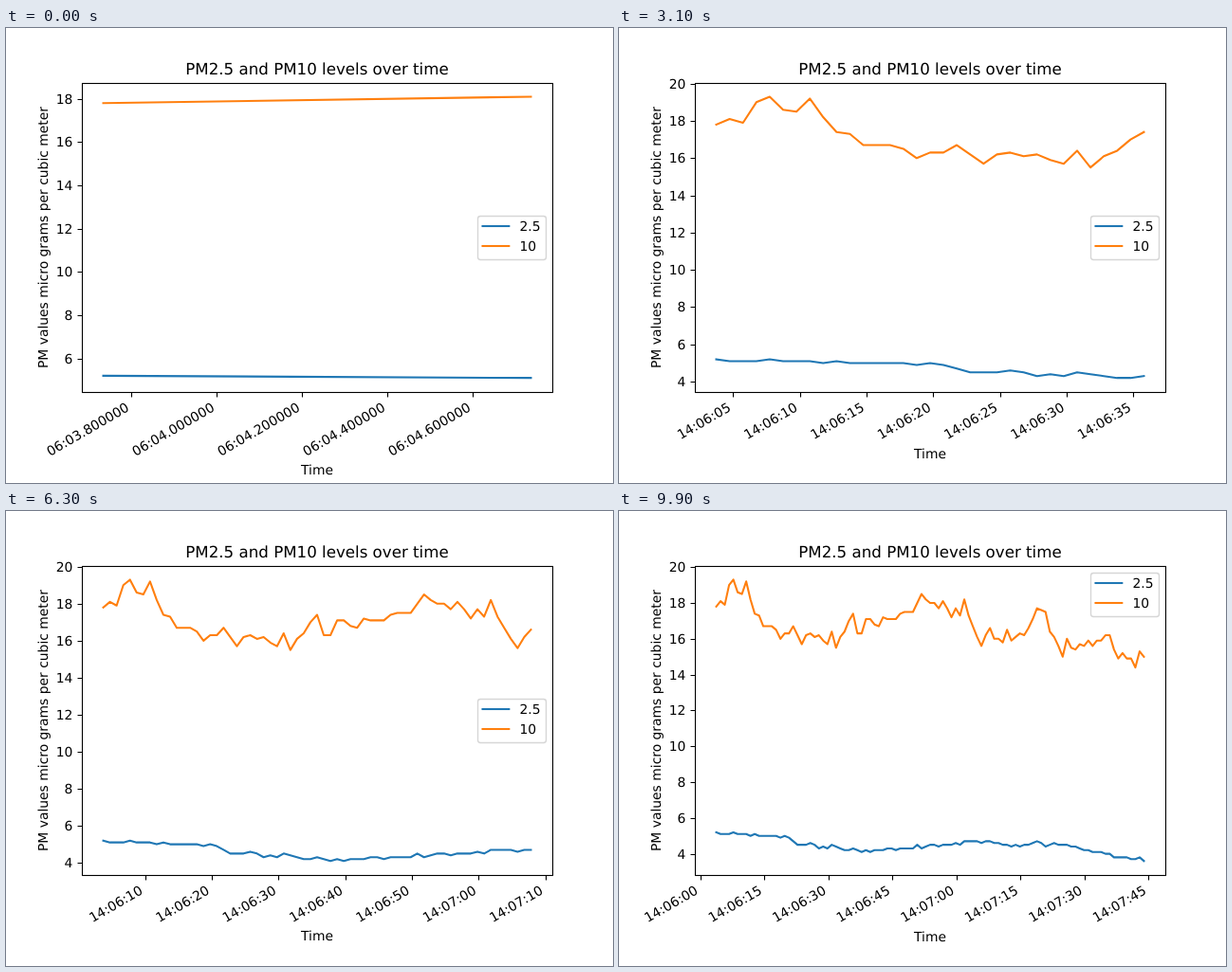
Write an HTML page that moves like this. It is 640x480 px and loops after 10 s.

```html
<!DOCTYPE html>
<html lang="en">
<head>
<meta charset="utf-8">
<title>PM levels</title>
<style>
  html, body { margin: 0; width: 100%; height: 100%; overflow: hidden; background: #fff; }
  svg { display: block; width: 640px; height: 480px; }
  text { font: 13.889px "DejaVu Sans", sans-serif; text-rendering: geometricPrecision; }
  .title { font-size: 16.667px; }
  .mid { text-anchor: middle; }
  .end { text-anchor: end; }
  .axis { fill: none; stroke: #000; stroke-width: 1.111; }
  .line { fill: none; stroke-width: 2.083; stroke-linejoin: round; stroke-linecap: square; }
  .fine { stroke: #1f77b4; }
  .coarse { stroke: #ff7f0e; }
  .frame { fill: #fff; fill-opacity: .8; stroke: #ccc; stroke-opacity: .8; stroke-width: 1.389; }
</style>
</head>
<body>
<svg viewBox="0 0 640 480">
  <path id="ticks" class="axis"/>
  <path id="fine" class="line fine"/>
  <path id="coarse" class="line coarse"/>
  <rect class="axis" x="80.5" y="58.5" width="496" height="326"/>
  <g id="labels"></g>
  <text class="title mid" x="328" y="49">PM2.5 and PM10 levels over time</text>
  <text class="mid" transform="translate(44 221) rotate(-90)">PM values micro grams per cubic meter</text>
  <text id="xlabel" class="mid" x="328">Time</text>
  <g id="legend">
    <rect class="frame" x="497.5" y="65.5" width="72" height="46" rx="2.8"/>
    <path class="line fine" d="M502.5 76h27.8"/>
    <path class="line coarse" d="M502.5 97h27.8"/>
    <text x="541.4" y="81">2.5</text>
    <text x="541.4" y="102">10</text>
  </g>
</svg>
<script>
// Readings in tenths of a microgram, one about every second
const pm25 = [
  52, 51, 51, 51, 52, 51, 51, 51, 50, 51, 50, 50, 50, 50, 50, 49, 50, 49, 47, 45,
  45, 45, 46, 45, 43, 44, 43, 45, 44, 43, 42, 42, 43, 42, 41, 42, 41, 42, 42, 42,
  43, 43, 42, 43, 43, 43, 43, 45, 43, 44, 45, 45, 44, 45, 45, 45, 46, 45, 47, 47,
  47, 47, 46, 47, 47, 46, 46, 45, 45, 44, 45, 44, 45, 45, 46, 47, 46, 44, 45, 46,
  45, 45, 45, 44, 44, 43, 42, 42, 41, 41, 41, 40, 40, 38, 38, 38, 38, 37, 37, 38, 36
];
const pm10 = [
  178, 181, 179, 190, 193, 186, 185, 192, 182, 174, 173, 167, 167, 167, 165, 160, 163, 163, 167, 162,
  157, 162, 163, 161, 162, 159, 157, 164, 155, 161, 164, 170, 174, 163, 163, 171, 171, 168, 167, 172,
  171, 171, 171, 174, 175, 175, 175, 180, 185, 182, 180, 180, 177, 181, 177, 172, 177, 173, 182, 173,
  167, 161, 156, 162, 166, 160, 160, 158, 165, 159, 161, 163, 162, 166, 171, 177, 176, 175, 164, 161,
  156, 150, 160, 155, 154, 157, 156, 159, 156, 159, 159, 162, 162, 154, 149, 152, 149, 149, 144, 153, 150
];
const START = 3.734, GAP = 1.0015;           // seconds after 14:06:00, sampling interval
const BOX = { x: 80, y: 57.6, w: 496, h: 326.4 };
const LEGEND = { left: 496.9, bottom: 110.6, drop: 133 };
const STEP_MS = 100, STEPS = 100;

const $ = id => document.getElementById(id);
const pad = (v, n = 2) => String(v).padStart(n, '0');
const path = pts => 'M' + pts.map(p => p.map(v => v.toFixed(2)).join(' ')).join('L');

// Date axis: aim for at least five ticks, with sub-second steps on short spans
function tickStep(span) {
  const secs = Math.floor(span);
  return secs < 5
    ? { step: [.2, .5, 1].find(s => span <= 7 * s), micro: true }
    : { step: [1, 5, 10, 15].find(s => secs <= 10 * s), micro: false };
}

function clock(s, micro) {
  const min = pad(6 + Math.floor(s / 60)), sec = s % 60;
  return micro ? `${min}:${pad(sec.toFixed(6), 9)}` : `14:${min}:${pad(sec)}`;
}

// True when the curve passes through the upper right legend area
function hitsLegend(pts) {
  return pts.some(([x, y], i) => {
    if (x < LEGEND.left) return false;
    let top = y;
    if (i) {
      const [px, py] = pts[i - 1];
      const f = Math.max(0, (LEGEND.left - px) / (x - px));
      top = Math.min(y, py + (y - py) * f);
    }
    return top <= LEGEND.bottom;
  });
}

function draw(step) {
  const n = step + 2;
  const low = pm25.slice(0, n).map(v => v / 10);
  const high = pm10.slice(0, n).map(v => v / 10);

  const yMin = Math.min(...low), yMax = Math.max(...high), yPad = (yMax - yMin) * .05;
  const y0 = yMin - yPad, y1 = yMax + yPad;
  const len = (n - 1) * GAP;
  const x0 = START - len * .05, x1 = START + len * 1.05;
  const X = s => BOX.x + (s - x0) / (x1 - x0) * BOX.w;
  const Y = v => BOX.y + (y1 - v) / (y1 - y0) * BOX.h;
  const points = values => values.map((v, i) => [X(START + i * GAP), Y(v)]);

  const highPts = points(high);
  $('fine').setAttribute('d', path(points(low)));
  $('coarse').setAttribute('d', path(highPts));

  let ticks = '', labels = '';
  for (let v = Math.ceil(y0 / 2) * 2; v <= y1; v += 2) {
    const y = Y(v);
    ticks += `M80.5 ${Math.round(y) + .5}h-5`;
    labels += `<text class="end" x="70.3" y="${Math.round(y + 5)}">${v}</text>`;
  }
  const { step: dt, micro } = tickStep(x1 - x0);
  for (let i = Math.ceil(x0 / dt); i * dt <= x1; i++) {
    const x = X(i * dt);
    ticks += `M${Math.round(x) + .5} 384.5v5`;
    labels += `<text class="end" transform="translate(${(x - 1.5).toFixed(2)} 403.2) rotate(-30)">${clock(i * dt, micro)}</text>`;
  }
  $('ticks').setAttribute('d', ticks);
  $('labels').innerHTML = labels;

  $('xlabel').setAttribute('y', micro ? 471 : dt === 10 ? 453 : 454);
  $('legend').setAttribute('transform', `translate(0 ${hitsLegend(highPts) ? LEGEND.drop : 0})`);
}

let shown = -1;
function tick() {
  const step = Math.floor(performance.now() / STEP_MS) % STEPS;
  if (step !== shown) draw(shown = step);
  requestAnimationFrame(tick);
}
tick();
</script>
</body>
</html>
```
